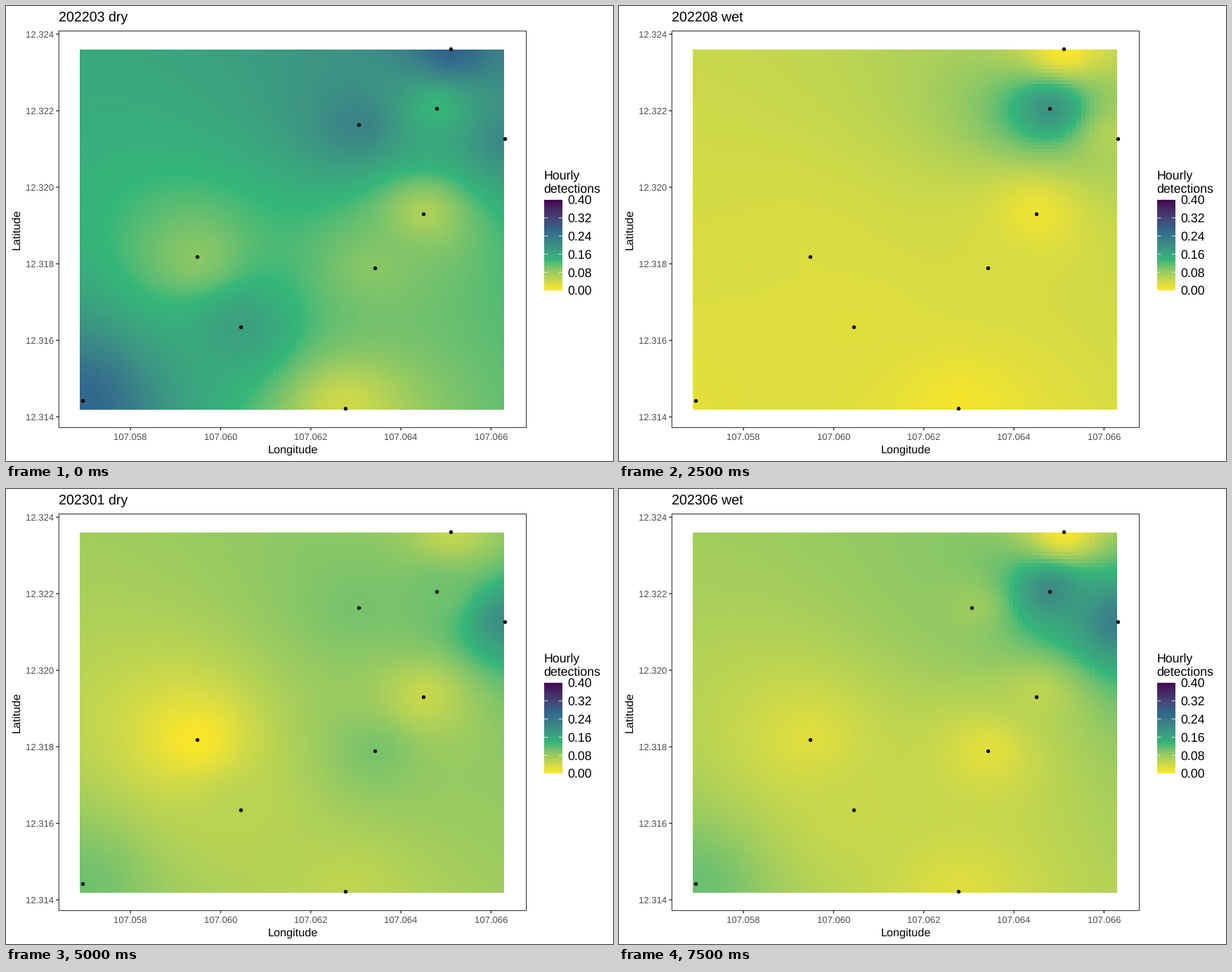
These frames come from a looping animation (864 px wide and 648 px high, 8 s). A matplotlib script:

```python
import numpy as np
import matplotlib.pyplot as plt
from matplotlib.animation import FuncAnimation

plt.rcParams["font.family"] = "Liberation Sans"
plt.rcParams["text.hinting"] = "none"
plt.rcParams["path.snap"] = False

W, H, DPI = 864, 648, 100
PT = 72 / DPI                      # points per pixel
LEFT, RIGHT, TOP, BOTTOM = 75.3, 740.6, 35.6, 600.4
LON0, LAT0 = 107.058, 12.314       # origin; positions in 0.001 degrees
CELLS = 94
GRID_X = (-1.117, 8.283)
GRID_Y = (0.192, 9.585)
MONTHS = 16

STATIONS = np.array([
    (-1.068, 0.429), (1.472, 4.183), (2.447, 2.360), (4.773, 0.231),
    (5.066, 7.633), (5.428, 3.894), (6.505, 5.305), (6.800, 8.050),
    (7.111, 9.613), (8.312, 7.272)])

# Months in which a station was silent.
SILENT = {4: (5, 6), 8: (3, 4, 7, 8), 9: (7, 8)}


def rates(m):
    """Hourly detections per station: a level, a fading start, busy spells."""
    def spell(centre, width=2.0):
        return np.exp(-((m - centre) / width) ** 2)

    def fade(tau):
        return np.exp(-m / tau)

    late = spell(15, 1.5)
    return np.array([
        .022 + .246 * spell(0, 1) + .09 * spell(9.5) + .088 * late,
        .09 * fade(2) + .022 * spell(5.5, 2.5) + .025 * late,
        .02 + .195 * spell(1) + .038 * spell(10.5, 1.7) + .023 * late,
        .005 + .065 * spell(1.5, 1.8) + .06 * spell(9, 1.7) + .1 * spell(13, 1.6),
        .078 + .142 * fade(2.2) + .088 * spell(8.5, 1.3),
        .022 + .07 * fade(2.5) + .08 * spell(9.7, 1.8),
        .004 + .062 * fade(2.5) + .078 * spell(11, 1.2) + .055 * spell(14.3),
        .148 - .062 * np.cos(2 * np.pi * (m - 11) / 9) + .025 * spell(7, 2.5),
        .275 * spell(0, 1.8) + .05 * spell(9.5) + .076 * spell(12.8, 1.3),
        .055 + .16 * spell(.5, 2.3) + .165 * spell(9.3) + .175 * spell(14.8, 2.2),
    ])


# --- colour scale, blended in Lab ---
WHITE = np.array([0.95047, 1.0, 1.08883])
TO_XYZ = np.array([[0.4124564, 0.3575761, 0.1804375],
                   [0.2126729, 0.7151522, 0.0721750],
                   [0.0193339, 0.1191920, 0.9503041]])


def rgb_to_lab(rgb):
    lin = np.where(rgb > 0.04045, ((rgb + 0.055) / 1.055) ** 2.4, rgb / 12.92)
    t = lin @ TO_XYZ.T / WHITE
    f = np.where(t > 0.008856, np.cbrt(t), 7.787 * t + 16 / 116)
    x, y, z = np.moveaxis(f, -1, 0)
    return np.stack([116 * y - 16, 500 * (x - y), 200 * (y - z)], -1)


def lab_to_rgb(lab):
    l, a, b = np.moveaxis(lab, -1, 0)
    y = (l + 16) / 116
    f = np.stack([y + a / 500, y, y - b / 200], -1)
    t = np.where(f > 0.2069, f ** 3, (f - 16 / 116) / 7.787)
    lin = np.clip((t * WHITE) @ np.linalg.inv(TO_XYZ).T, 0, 1)
    return np.where(lin > 0.0031308, 1.055 * lin ** (1 / 2.4) - 0.055, 12.92 * lin)


STOPS = ("FDE725", "35B779", "31688E", "440154")
STOP_LAB = rgb_to_lab(np.array(
    [[int(s[i:i + 2], 16) / 255 for i in (0, 2, 4)] for s in STOPS]))


def colour(v):
    pos = np.linspace(0, 0.4, len(STOPS))
    lab = np.stack([np.interp(v, pos, STOP_LAB[:, i]) for i in range(3)], -1)
    return np.clip(lab_to_rgb(lab), 0, 1)


# --- data ---
def centres(lo, hi):
    return lo + (np.arange(CELLS) + 0.5) * (hi - lo) / CELLS


GX, GY = np.meshgrid(centres(*GRID_X), centres(*GRID_Y))


def active(month):
    return np.array([month not in SILENT.get(i, ()) for i in range(len(STATIONS))])


def surface(pts, vals):
    """Inverse distance weighting, power two."""
    d2 = (GX[..., None] - pts[:, 0]) ** 2 + (GY[..., None] - pts[:, 1]) ** 2
    w = 1 / np.maximum(d2, 1e-9)
    return (w * vals).sum(-1) / w.sum(-1)


def title_for(month):
    year, m = divmod(month + 2, 12)
    season = "wet" if 5 <= m + 1 <= 10 else "dry"
    return f"{2022 + year}{m + 1:02d} {season}"


def scale(grid, pts, start, end):
    """Linear map from data to pixels with 5 % padding on both sides."""
    lo, hi = min(grid[0], pts.min()), max(grid[1], pts.max())
    pad = 0.05 * (hi - lo)
    k = (end - start) / (hi - lo + 2 * pad)
    return lambda v: start + (np.asarray(v) - lo + pad) * k


# --- stage in pixel coordinates ---
fig = plt.figure(figsize=(W / DPI, H / DPI), dpi=DPI, facecolor="white")
ax = fig.add_axes([0, 0, 1, 1])
ax.axis("off")


def text(x, y, s, size, color="black", **kw):
    return ax.text(x, y, s, fontsize=size * PT, color=color, va="baseline", **kw)


def line(xs, ys, color="#333333", width=1.4):
    return ax.plot(xs, ys, color=color, lw=width * PT, solid_capstyle="butt")[0]


def image(rgb, extent):
    return ax.imshow(rgb, origin="lower", aspect="auto",
                     interpolation="nearest", extent=extent, zorder=1)


raster = image(np.ones((CELLS, CELLS, 3)), (105, 709, 575, 62))
dots = ax.scatter(*STATIONS.T, s=(5.4 * PT) ** 2, color="black", lw=0, zorder=4)
ax.add_patch(plt.Rectangle((LEFT, TOP), RIGHT - LEFT, BOTTOM - TOP, fill=False,
                           ec="#333333", lw=1.1 * PT, zorder=3))

title = text(74.8, 22.3, "", 19.6)
text((LEFT + RIGHT) / 2, 636.6, "Longitude", 16.3, ha="center")
text(19.4, (TOP + BOTTOM) / 2, "Latitude", 16.3, ha="center",
     rotation=90, rotation_mode="anchor")

x_ticks = np.arange(0, 9, 2)
y_ticks = np.arange(0, 11, 2)
x_marks = [(line([0, 0], [BOTTOM, BOTTOM + 4.1]),
            text(0, 617.8, f"{LON0 + t / 1000:.3f}", 13.07, "#4D4D4D", ha="center"))
           for t in x_ticks]
y_marks = [(line([LEFT - 4.1, LEFT], [0, 0]),
            text(68, 0, f"{LAT0 + t / 1000:.3f}", 13.07, "#4D4D4D", ha="right"))
           for t in y_ticks]

# legend
BAR = (766, 792, 405, 276)
text(765.5, 246.3, "Hourly", 17.8)
text(765.5, 265.6, "detections", 17.8)
image(colour(np.linspace(0, 0.4, 300))[:, None], BAR)
for v in np.linspace(0, 0.4, 6):
    y = BAR[2] + (BAR[3] - BAR[2]) * v / 0.4
    text(799.8, y + 6.3, f"{v:.2f}", 17.8)
    if 0 < v < 0.4:
        line([BAR[0], BAR[0] + 5.2], [y, y], "white", 0.8)
        line([BAR[1] - 5.2, BAR[1]], [y, y], "white", 0.8)

ax.set_xlim(0, W)
ax.set_ylim(H, 0)


def update(month):
    on = active(month)
    pts = STATIONS[on]
    px = scale(GRID_X, pts[:, 0], LEFT, RIGHT)
    py = scale(GRID_Y, pts[:, 1], BOTTOM, TOP)
    title.set_text(title_for(month))
    raster.set_data(colour(surface(pts, rates(month)[on])))
    (x0, x1), (y0, y1) = px(GRID_X), py(GRID_Y)
    raster.set_extent((np.floor(x0), np.ceil(x1), np.ceil(y0), np.floor(y1)))
    dots.set_offsets(np.column_stack([px(pts[:, 0]), py(pts[:, 1])]))
    for t, (mark, label) in zip(x_ticks, x_marks):
        mark.set_xdata([px(t)] * 2)
        label.set_x(px(t))
    for t, (mark, label) in zip(y_ticks, y_marks):
        mark.set_ydata([py(t)] * 2)
        label.set_y(py(t) + 4.7)
    return raster, dots, title


anim = FuncAnimation(fig, update, frames=MONTHS, interval=500,
                     repeat=True, repeat_delay=0, blit=False)
plt.show()
```
